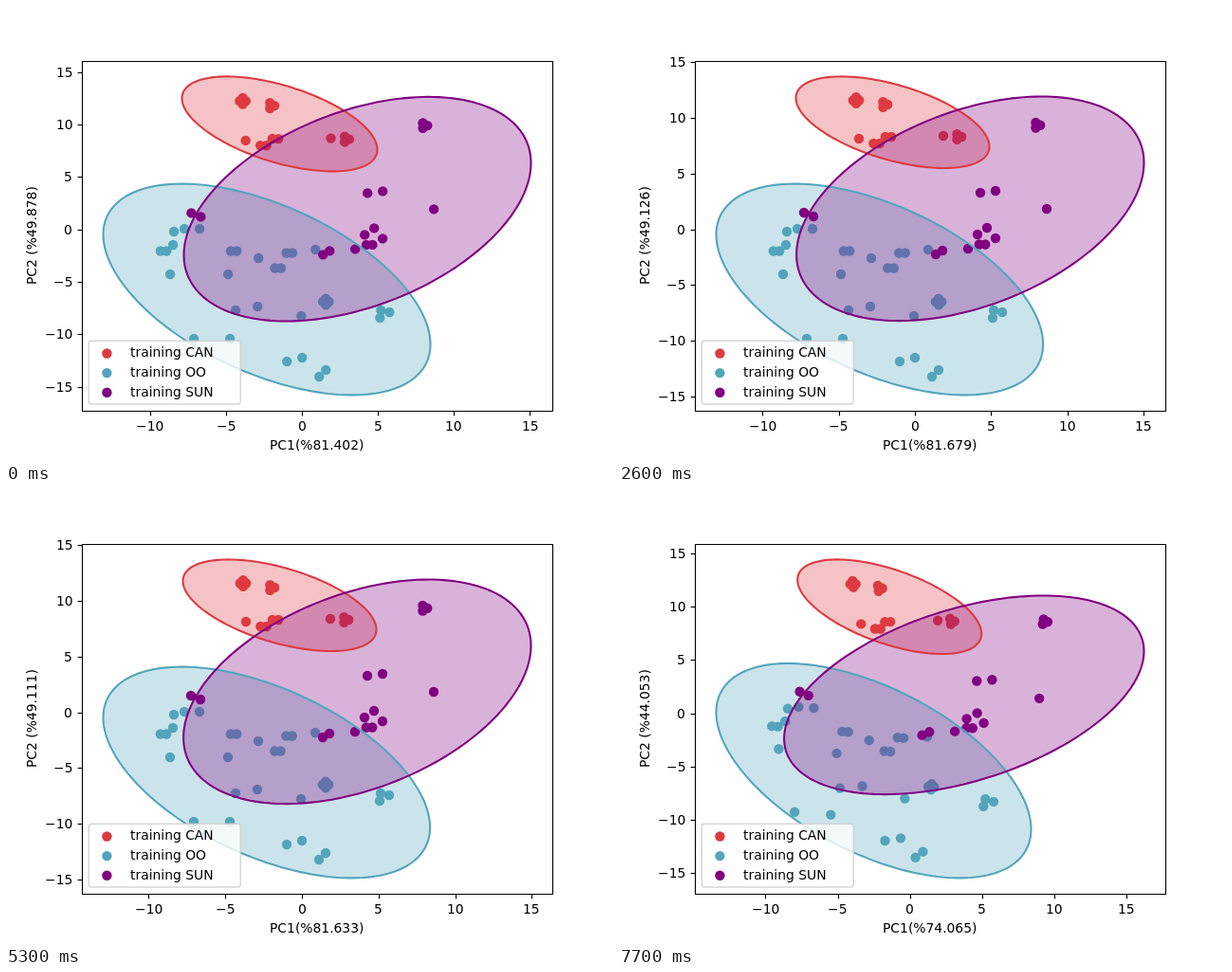
Write an HTML page with a canvas that moves like this. It is 640x480 px and loops after 7800 ms.

```html
<!DOCTYPE html>
<html lang="en">
<head>
<meta charset="utf-8">
<title>PCA scatter</title>
<style>
html, body { margin: 0; width: 100%; height: 100%; overflow: hidden; background: #fff; }
canvas { display: block; width: 640px; height: 480px; }
</style>
</head>
<body>
<canvas id="plot" width="640" height="480"></canvas>
<script>
const ctx = document.getElementById('plot').getContext('2d');
const LOOP = 7800, STEP = 100, TAU = 2 * Math.PI;
const BOX = { l: 80, t: 58, r: 576, b: 427 };
const FONT = '13.89px "DejaVu Sans", Verdana, sans-serif';

// time, PC1 %, PC2 %
const SHARES = [
  [0, 81.402, 49.878], [1600, 81.708, 49.202], [2600, 81.679, 49.126], [3800, 81.654, 49.183],
  [4700, 81.632, 48.978], [5900, 81.635, 49.245], [7700, 74.065, 44.053]
];

// x of zero, px per x unit, y of zero, px per y unit
const SCALE = {
  start: [312, 16.03, 235.7, 11.06],
  bump: [313, 16.17, 234.7, 11.95],
  end: [306.6, 15.22, 236.5, 11.23]
};

// rings: centre x, y, half width, half height, correlation; turn: spin of the dots at the end
// dots: x, y at rest and, for a cluster, its size
const GROUPS = [
  {
    name: 'training CAN', color: '#dd3a40', turn: -0.06,
    rest: [288.5, 122.7, 102, 48.3, 0.53],
    start: [288.5, 124.4, 103, 50, 0.54],
    bump: [286.2, 121.2, 103.8, 46.8, 0.5],
    end: [285.2, 124.2, 97, 49.8, 0.57],
    dots: [
      [250, 99.5, 4], [280, 104, 3], [253, 140], [284, 138, 2], [271.5, 145, 2],
      [342, 137], [358, 138, 3]
    ]
  },
  {
    name: 'training OO', color: '#53a5bc', turn: 0.07,
    rest: [274.8, 299, 172.3, 111.4, 0.52],
    start: [275, 299, 172.5, 111.4, 0.52],
    bump: [277.8, 300.5, 175.3, 109.9, 0.51],
    end: [268.5, 297.2, 166, 113.2, 0.545],
    dots: [
      [166, 258.5, 2], [176, 252], [177, 238], [188, 235], [204, 235], [173, 283],
      [240, 258.5, 2], [234, 283], [266, 266], [286.5, 276.5, 2], [298.5, 260.5, 2],
      [326, 257], [242, 321], [265, 317], [311, 327], [337, 312, 4], [198, 351], [236, 351],
      [296, 375], [312, 371], [330, 391], [337, 384], [395, 321], [394, 329], [404, 323]
    ]
  },
  {
    name: 'training SUN', color: '#800080', turn: 0.1,
    rest: [370.3, 213.8, 183.2, 118.3, -0.41],
    start: [370.5, 214.2, 183, 118.3, -0.41],
    bump: [371, 210.5, 182.5, 123, -0.44],
    end: [363.8, 217.3, 189.7, 104.8, -0.44],
    dots: [
      [195, 218], [205, 222], [334, 262], [341, 258], [368, 256], [378, 241], [383, 251.5, 2],
      [388, 234], [397, 245], [381, 197], [397, 195], [451, 214], [441, 125.7, 3]
    ]
  }
];

const clamp = v => Math.min(1, Math.max(0, v));
const easeEnd = t => clamp((t - 6700) / 1000) ** 3;

function weights(t) {
  return {
    start: clamp(1 - t / 1800),
    bump: clamp(1 - Math.abs(t - 4700) / 400),
    end: easeEnd(t)
  };
}

function mix(rest, poses, w) {
  return rest.map((v, k) => Object.keys(w)
    .reduce((sum, key) => sum + (poses[key][k] - v) * w[key], v));
}

function scaleAt(t, w) {
  const drift = clamp((t - 1600) / 2200);
  return mix([312, 16.03 + 0.12 * drift, 235.5, 11.74], SCALE, w);
}

function sharesAt(t) {
  let i = 0;
  while (i < SHARES.length - 2 && t >= SHARES[i + 1][0]) i++;
  const a = SHARES[i], b = SHARES[i + 1];
  const p = i === SHARES.length - 2 ? easeEnd(t) : (t - a[0]) / (b[0] - a[0]);
  return [1, 2].map(k => (a[k] + (b[k] - a[k]) * p).toFixed(3));
}

// Unit plane to stage and back: the unit circle lands on the ring
function place([cx, cy, w, h, rho], u, v) {
  return [cx + w * u, cy + h * (rho * u + Math.sqrt(1 - rho * rho) * v)];
}

function unplace([cx, cy, w, h, rho], x, y) {
  const u = (x - cx) / w;
  return [u, ((y - cy) / h - rho * u) / Math.sqrt(1 - rho * rho)];
}

// A cluster is spread evenly on a small circle
function spread([x, y, n = 1]) {
  const r = n > 1 ? 3.2 : 0;
  return Array.from({ length: n }, (_, i) =>
    [x + r * Math.cos(TAU * i / n), y + r * Math.sin(TAU * i / n)]);
}

for (const g of GROUPS) {
  g.units = g.dots.flatMap(spread).map(([x, y]) => unplace(g.rest, x, y));
}

function disc(x, y, color) {
  ctx.fillStyle = color;
  ctx.beginPath();
  ctx.arc(x, y, 5.2, 0, TAU);
  ctx.fill();
}

function ringPath(ring) {
  ctx.beginPath();
  for (let i = 0; i < 180; i++) {
    const a = TAU * i / 180;
    ctx.lineTo(...place(ring, Math.cos(a), Math.sin(a)));
  }
  ctx.closePath();
}

// align: 0 left, 0.5 centre, 1 right
function text(str, x, y, align) {
  ctx.fillStyle = '#000';
  ctx.fillText(str, Math.round(x - align * ctx.measureText(str).width), Math.round(y));
}

function line(x1, y1, x2, y2) {
  ctx.beginPath();
  ctx.moveTo(x1, y1);
  ctx.lineTo(x2, y2);
  ctx.stroke();
}

function drawAxes([x0, kx, y0, ky], [pc1, pc2]) {
  ctx.strokeStyle = '#000';
  ctx.lineWidth = 1.11;
  ctx.strokeRect(BOX.l + 0.5, BOX.t + 0.5, BOX.r - BOX.l, BOX.b - BOX.t);
  for (let v = -20; v <= 20; v += 5) {
    const label = String(v).replace('-', '\u2212');
    const x = x0 + kx * v, y = y0 - ky * v;
    if (x > BOX.l && x < BOX.r) {
      const px = Math.round(x) + 0.5;
      line(px, BOX.b + 0.5, px, BOX.b + 5.4);
      text(label, x, 448, 0.5);
    }
    if (y > BOX.t - 0.4 && y < BOX.b) {
      const py = Math.round(y) + 0.5;
      line(BOX.l - 4.4, py, BOX.l + 0.5, py);
      text(label, 70.3, y + 5, 1);
    }
  }
  text(`PC1(%${pc1})`, 328, 468, 0.5);
  ctx.save();
  ctx.translate(32, 242);
  ctx.rotate(-Math.PI / 2);
  text(`PC2 (%${pc2})`, 0, 0, 0.5);
  ctx.restore();
}

function drawLegend() {
  ctx.beginPath();
  ctx.roundRect(87.3, 353.3, 160, 66.7, 2.8);
  ctx.fillStyle = 'rgba(255,255,255,0.8)';
  ctx.fill();
  ctx.strokeStyle = 'rgba(204,204,204,0.8)';
  ctx.lineWidth = 1.39;
  ctx.stroke();
  GROUPS.forEach((g, i) => {
    disc(106.4, 366.5 + 20.6 * i, g.color);
    text(g.name, 131, 370 + 21 * i, 0);
  });
}

function draw(t) {
  const w = weights(t);
  const rings = GROUPS.map(g => mix(g.rest, g, w));
  ctx.fillStyle = '#fff';
  ctx.fillRect(0, 0, 640, 480);
  ctx.font = FONT;
  ctx.lineJoin = 'round';

  GROUPS.forEach((g, i) => {
    const c = Math.cos(g.turn * w.end), s = Math.sin(g.turn * w.end);
    for (const [u, v] of g.units) {
      disc(...place(rings[i], u * c - v * s, u * s + v * c), g.color);
    }
    ringPath(rings[i]);
    ctx.globalAlpha = 0.3;
    ctx.fill();
    ctx.globalAlpha = 1;
  });
  GROUPS.forEach((g, i) => {
    ringPath(rings[i]);
    ctx.strokeStyle = g.color;
    ctx.lineWidth = 2.08;
    ctx.stroke();
  });
  drawAxes(scaleAt(t, w), sharesAt(t));
  drawLegend();
}

const begin = performance.now();
function tick() {
  const t = (performance.now() - begin) % LOOP;
  draw(Math.floor(t / STEP) * STEP);
  requestAnimationFrame(tick);
}
tick();
</script>
</body>
</html>
```
